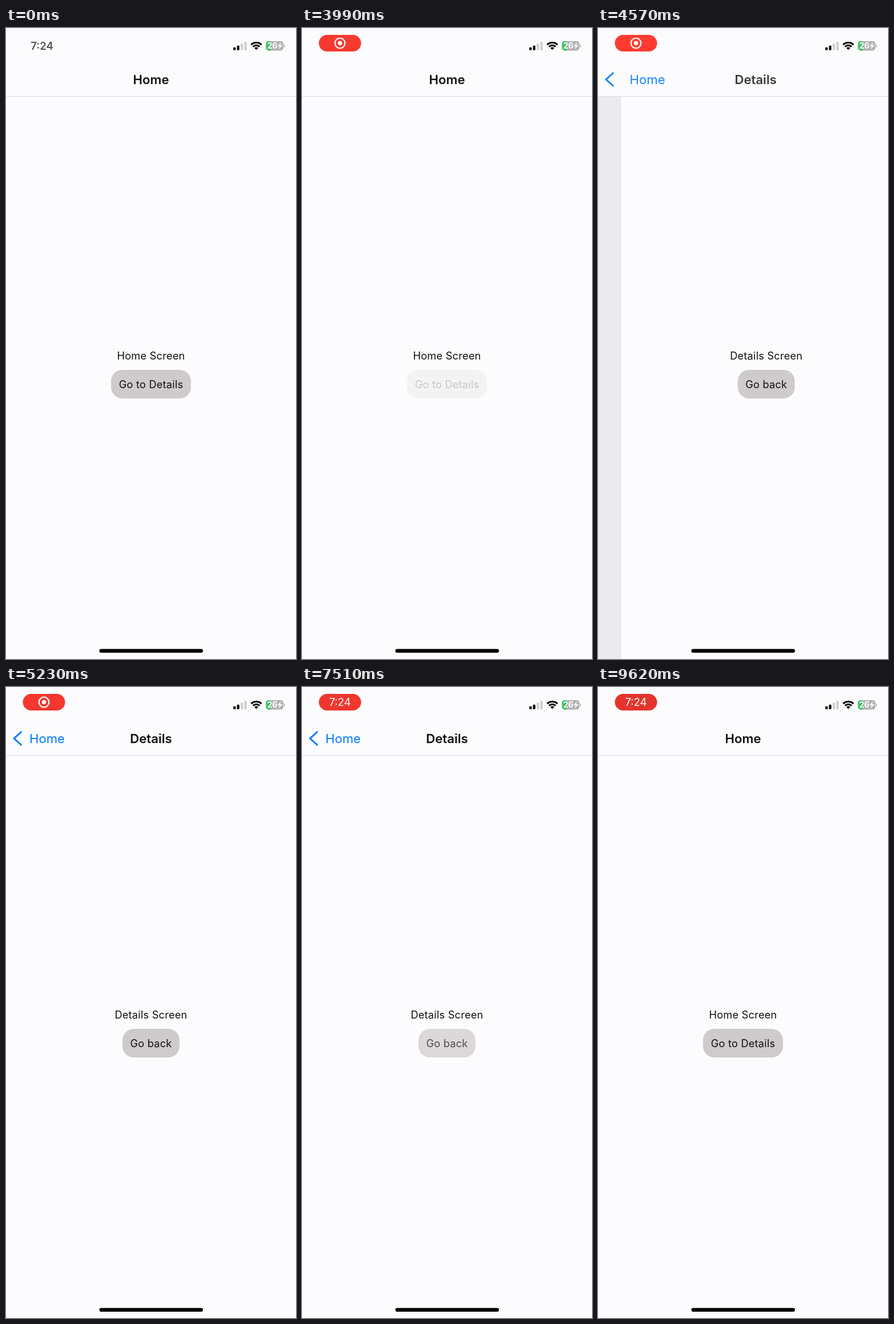
These frames come from a looping animation (508x1102 px, 9.67 s). An HTML page with a canvas:

```html
<!DOCTYPE html>
<html lang="en">
<head>
<meta charset="utf-8">
<title>Stack navigation</title>
<style>
  html, body { margin: 0; width: 100%; height: 100%; overflow: hidden; background: #fcfcfe; }
  canvas { display: block; }
</style>
</head>
<body>
<canvas id="stage" width="508" height="1102"></canvas>
<script>
const W = 508, H = 1102, LOOP = 9670, MID = W / 2, HEADER = 120;
const BG = '#fcfcfe', INK = '#111114', BLUE = '#007aff';
const PUSH = 4326, POP = 7716;
const ctx = document.getElementById('stage').getContext('2d');

const clamp = v => Math.min(1, Math.max(0, v));
const ramp = (t, from, to) => {
  const v = clamp((t - from) / (to - from));
  return v * v * (3 - 2 * v);
};

// Critically damped spring from 0 to 1
function spring(ms) {
  const x = Math.max(0, ms) * 0.017;
  return 1 - (1 + x) * Math.exp(-x);
}

function withAlpha(alpha, draw) {
  if (alpha <= 0) return;
  ctx.save();
  ctx.globalAlpha *= alpha;
  draw();
  ctx.restore();
}

function box(x, y, w, h, r, fill) {
  ctx.fillStyle = fill;
  ctx.beginPath();
  ctx.roundRect(x, y, w, h, r);
  ctx.fill();
}

function text(str, x, y, size, weight = 400, fill = INK, spacing = 0) {
  ctx.font = `${weight} ${size}px Inter, Roboto, sans-serif`;
  ctx.letterSpacing = spacing + 'px';
  ctx.textAlign = 'center';
  ctx.fillStyle = fill;
  ctx.fillText(str, x, y);
}

function line(points, width, color) {
  ctx.strokeStyle = color;
  ctx.lineWidth = width;
  ctx.lineCap = ctx.lineJoin = 'round';
  ctx.beginPath();
  points.forEach(p => ctx.lineTo(...p));
  ctx.stroke();
}

// Button opacity for a touch held between two times
const touch = (t, down, up) => 1 - 0.8 * (ramp(t, down, down + 150) - ramp(t, up, up + 250));

function page(x, title, label, width, opacity) {
  text(title, x + MID, 578.5, 18.24, 400, INK, 0.2);
  withAlpha(opacity, () => {
    box(x + MID - width / 2, 597, width, 50, 20, '#cfcacb');
    text(label, x + MID, 629, 18.24, 400, INK, 0.2);
  });
}

function body(t, q) {
  const edge = W * (1 - q);
  ctx.save();
  ctx.beginPath();
  ctx.rect(0, HEADER, W, H - HEADER);
  ctx.clip();
  page(-142 * q, 'Home Screen', 'Go to Details', 140, touch(t, 3790, 4280));
  if (q > 0) {
    ctx.fillStyle = `rgba(20, 0, 10, ${0.075 * q})`;
    ctx.fillRect(0, HEADER, edge, H - HEADER);
    ctx.fillStyle = BG;
    ctx.fillRect(edge, HEADER, W, H - HEADER);
    page(edge, 'Details Screen', 'Go back', 100, touch(t, 7450, 7670));
  }
  ctx.restore();
}

function header(q) {
  const homeX = MID - 182 * q;
  withAlpha(1 - 2 * q, () => text('Home', homeX, 98, 22.14, 600));
  withAlpha(q, () => {
    text('Home', homeX, 98, 22.14, 400, BLUE);
    line([[26.5, 78.5], [14, 89.8], [26.5, 101]], 3, BLUE);
  });
  withAlpha((q - 0.55) / 0.45, () => text('Details', MID + 276 * (1 - q), 98, 22.14, 600));
  ctx.fillStyle = '#dcdcdf';
  ctx.fillRect(0, 119, W, 1);
}

function recordingPill(t) {
  withAlpha(0.72 * (1 - ramp(t, 20, 250)), () => text('7:24', 63, 38, 18.5, 600));

  const shown = ramp(t, 60, 400), scale = 0.7 + 0.3 * shown;
  const pulse = 0.5 + 0.5 * Math.cos((t - 4520) / 3850 * 2 * Math.PI);
  const clock = ramp(t, 7250, 7450);
  withAlpha(shown, () => {
    ctx.translate(66.5, 26.5);
    ctx.scale(scale, scale);
    box(-37, -14.5, 74, 29, 14.5, `rgb(${219 + 36 * pulse}, ${50 + 9 * pulse}, ${44 + 4 * pulse})`);
    withAlpha(1 - clock, () => {
      ctx.strokeStyle = '#fff';
      ctx.lineWidth = 2.2;
      ctx.beginPath();
      ctx.arc(0, 0, 8.8, 0, 7);
      ctx.stroke();
      box(-3.8, -3.8, 7.6, 7.6, 3.8, '#fff');
    });
    withAlpha(clock, () => text('7:24', 0, 6.7, 18.5, 400, '#fff'));
  });
}

function wifi(x, y) {
  ctx.fillStyle = ctx.strokeStyle = '#000';
  ctx.lineCap = 'butt';
  ctx.lineWidth = 3;
  const from = -Math.PI * 0.75, to = -Math.PI * 0.25;
  for (const r of [12.7, 8]) {
    ctx.beginPath();
    ctx.arc(x, y, r, from, to);
    ctx.stroke();
  }
  ctx.beginPath();
  ctx.moveTo(x, y);
  ctx.arc(x, y, 4.8, from, to);
  ctx.fill();
}

function battery() {
  ctx.save();
  ctx.beginPath();
  ctx.roundRect(455.5, 23, 30.5, 16.5, 5);
  ctx.clip();
  ctx.fillStyle = '#b3b1b4';
  ctx.fillRect(455, 23, 32, 17);
  ctx.fillStyle = '#34c759';
  ctx.fillRect(455, 23, 8.5, 17);
  ctx.restore();
  box(487, 28.5, 1.8, 5.5, [0, 1.8, 1.8, 0], '#b3b1b4');
  text('26', 466.5, 36.4, 14.2, 700, '#fff');
  ctx.beginPath();
  [[481.5, 25], [475.5, 32], [479.3, 32], [477.8, 37.5], [484.3, 30.2], [480.4, 30.2]]
    .forEach(p => ctx.lineTo(...p));
  ctx.fill();
}

function statusIcons() {
  [5, 8, 11.5, 14.8].forEach((h, i) =>
    box(398.2 + i * 6.4, 38.7 - h, 4.2, h, 1.2, i < 2 ? '#000' : '#cfcfd2'));
  wifi(438.5, 38.3);
  battery();
}

function draw(t) {
  const q = t < POP ? spring(t - PUSH) : 1 - spring(t - POP);
  ctx.fillStyle = BG;
  ctx.fillRect(0, 0, W, H);
  body(t, q);
  header(q);
  recordingPill(t);
  statusIcons();
  box(163.5, 1084.5, 181.5, 6.5, 3.25, '#000');
}

const start = performance.now();
function tick() {
  draw((performance.now() - start) % LOOP);
  requestAnimationFrame(tick);
}
tick();
</script>
</body>
</html>
```
